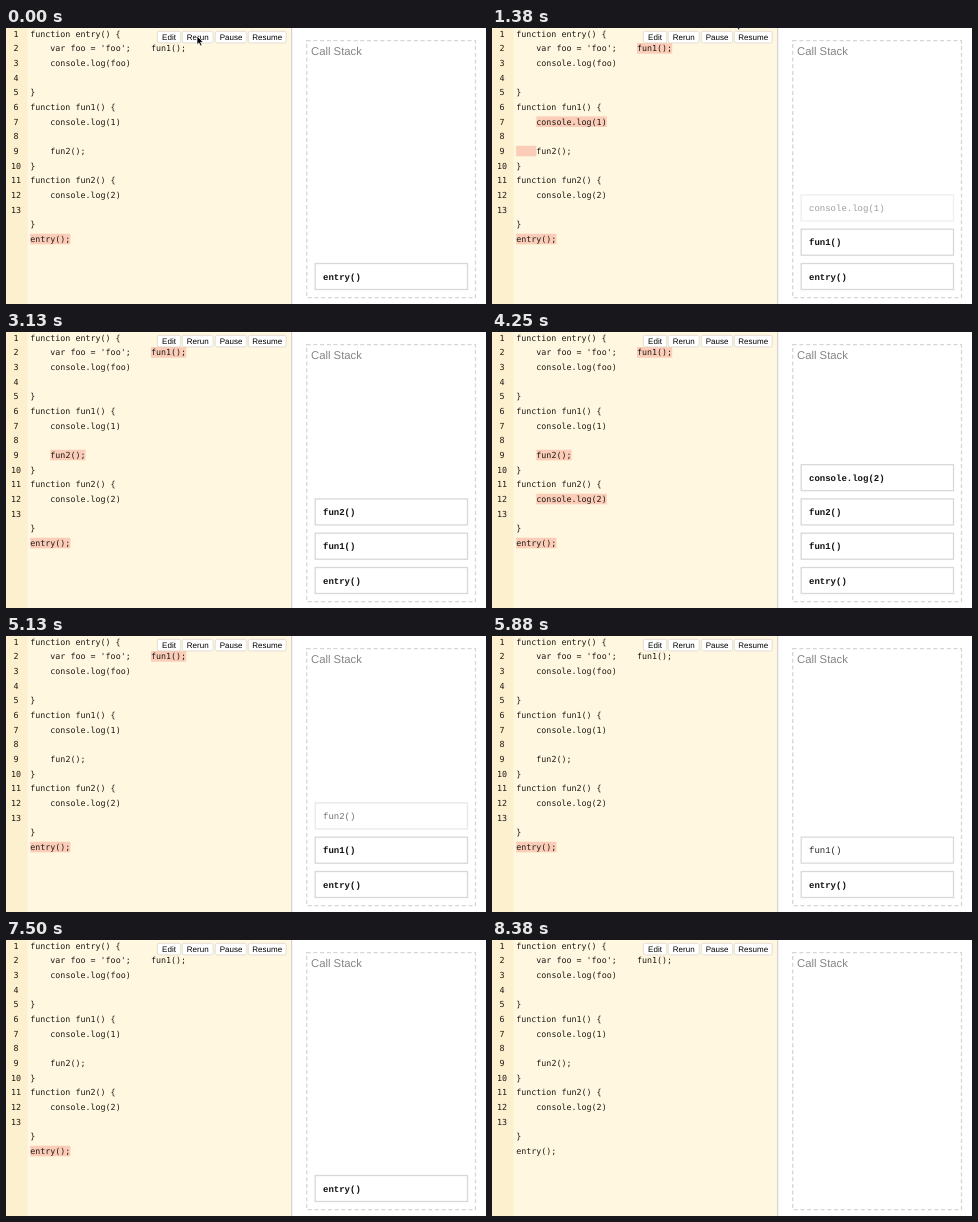
Write an HTML page that moves like this. It is 480 px wide and 276 px high and loops after 8.76 s.

```html
<!DOCTYPE html>
<html lang="en">
<head>
<meta charset="utf-8">
<title>Call stack</title>
<style>
html, body { margin: 0; width: 100%; height: 100%; overflow: hidden; background: #fff; }
svg { display: block; text-rendering: geometricPrecision; }
.code { font: 8.36px "DejaVu Sans Mono", monospace; fill: #1c1a15; }
.num { text-anchor: middle; }
.button { font: 8px "Liberation Sans", Arial, sans-serif; text-anchor: middle; }
.title { font: 11.3px "Liberation Sans", Arial, sans-serif; fill: #858585; }
.call { font: 9px "Liberation Mono", "Courier New", monospace; fill: #111; }
</style>
</head>
<body>
<svg id="stage" width="480" height="276" viewBox="0 0 480 276"></svg>
<script>
const LOOP = 8760, STEP = 125, LEFT = 24.2, CHAR = 5.033, LINE = 14.667;
const stage = document.getElementById('stage');

function add(tag, attrs, parent = stage, text = '') {
  const el = document.createElementNS('http://www.w3.org/2000/svg', tag);
  for (const key in attrs) el.setAttribute(key, attrs[key]);
  el.textContent = text;
  parent.append(el);
  return el;
}
const rect = (x, y, width, height, fill, more, parent) =>
  add('rect', { x, y, width, height, fill, ...more }, parent);
const write = (x, y, cls, text, parent) => add('text', { x, y, class: cls }, parent, text);
const ramp = (t, from, to) => Math.min(1, Math.max(0, (t - from) / (to - from)));
const rowY = row => 5.6 + (row - 1) * LINE;
const mark = (row, col, length, parent) =>
  rect(LEFT + col * CHAR, rowY(row) - 5.2, length * CHAR, 10.6, '#fbcdb8', {}, parent);

const code = `function entry() {
    var foo = 'foo';    fun1();
    console.log(foo)

}
function fun1() {
    console.log(1)

    fun2();
}
function fun2() {
    console.log(2)

}
entry();`.split('\n');

// fade in from `start` to `full`, fade out for 250 ms after `leave`
const calls = [
  { name: 'entry()', slot: 0, row: 15, col: 0, length: 8, start: -500, full: -100, leave: 8020 },
  { name: 'fun1()', slot: 1, row: 2, col: 24, length: 7, start: 300, full: 750, leave: 5850 },
  { name: 'console.log(1)', slot: 2, row: 7, col: 4, length: 14, start: 1120, full: 1750, leave: 2020 },
  { name: 'fun2()', slot: 2, row: 9, col: 4, length: 7, start: 2690, full: 3125, leave: 5020 },
  { name: 'console.log(2)', slot: 3, row: 12, col: 4, length: 14, start: 3500, full: 3875, leave: 4250 },
  { name: 'console.log(foo)', slot: 1, row: 3, col: 4, length: 16, start: 6500, full: 6875, leave: 7250 }
];

// Editor
rect(0, 0, 285, 276, '#fff7e0');
rect(0, 0, 21.5, 276, '#fcf0ce');
rect(285, 0, 1.3, 276, '#d6d6d6');
for (const call of calls) {
  call.marks = add('g', {});
  mark(call.row, call.col, call.length, call.marks);
  if (call.row === 7) mark(9, 0, 4, call.marks);
}
code.forEach((line, i) => {
  const y = rowY(i + 1) + 2.9;
  if (i < 13) write(10, y, 'code num', i + 1);
  for (const part of line.matchAll(/\S+( \S+)*/g)) {
    write(LEFT + part.index * CHAR, y, 'code', part[0]);
  }
});

for (const [label, x, width] of [['Edit', 151, 24], ['Rerun', 176, 31.5], ['Pause', 209, 32], ['Resume', 242, 38.5]]) {
  rect(x + .3, 3.3, width - .6, 11.6, '#fff', { rx: 2, stroke: '#d9d3c3', 'stroke-width': .7 });
  write(x + width / 2, 12, 'button', label);
}

// Call stack
rect(300.7, 12.7, 168.8, 257, 'none', { stroke: '#d6d6d6', 'stroke-width': 1.3, 'stroke-dasharray': '4 2.7' });
write(305, 27.3, 'title', 'Call Stack');
for (const call of calls) {
  const y = 235.5 - call.slot * 34.3;
  call.box = add('g', {});
  rect(309.2, y, 152.3, 26, '#fff', { stroke: '#d6d8d9', 'stroke-width': 1.3 }, call.box);
  call.label = write(317, y + 16, 'call', call.name, call.box);
}

const cursor = add('path', {
  d: 'M0 0V8.6L2 6.9L3.4 10L5 9.3L3.6 6.3H6.2Z',
  fill: '#000', stroke: '#fff', 'stroke-width': .7
});

function draw(now) {
  const t = Math.floor(now % LOOP / STEP) * STEP;
  for (const { start, full, leave, marks, box, label } of calls) {
    const alpha = ramp(t, start, full) * (1 - ramp(t, leave, leave + 250));
    marks.style.display = t > start && t <= leave ? '' : 'none';
    box.style.opacity = alpha;
    label.style.fontWeight = alpha === 1 ? 'bold' : 'normal';
  }
  const move = ramp(t, 250, 750);
  cursor.setAttribute('transform', `translate(${191 + 52 * move} ${8 - 16 * move})`);
  cursor.style.display = t < 1500 ? '' : 'none';
}

const begin = performance.now();
function tick() {
  draw(performance.now() - begin);
  requestAnimationFrame(tick);
}
tick();
</script>
</body>
</html>
```
